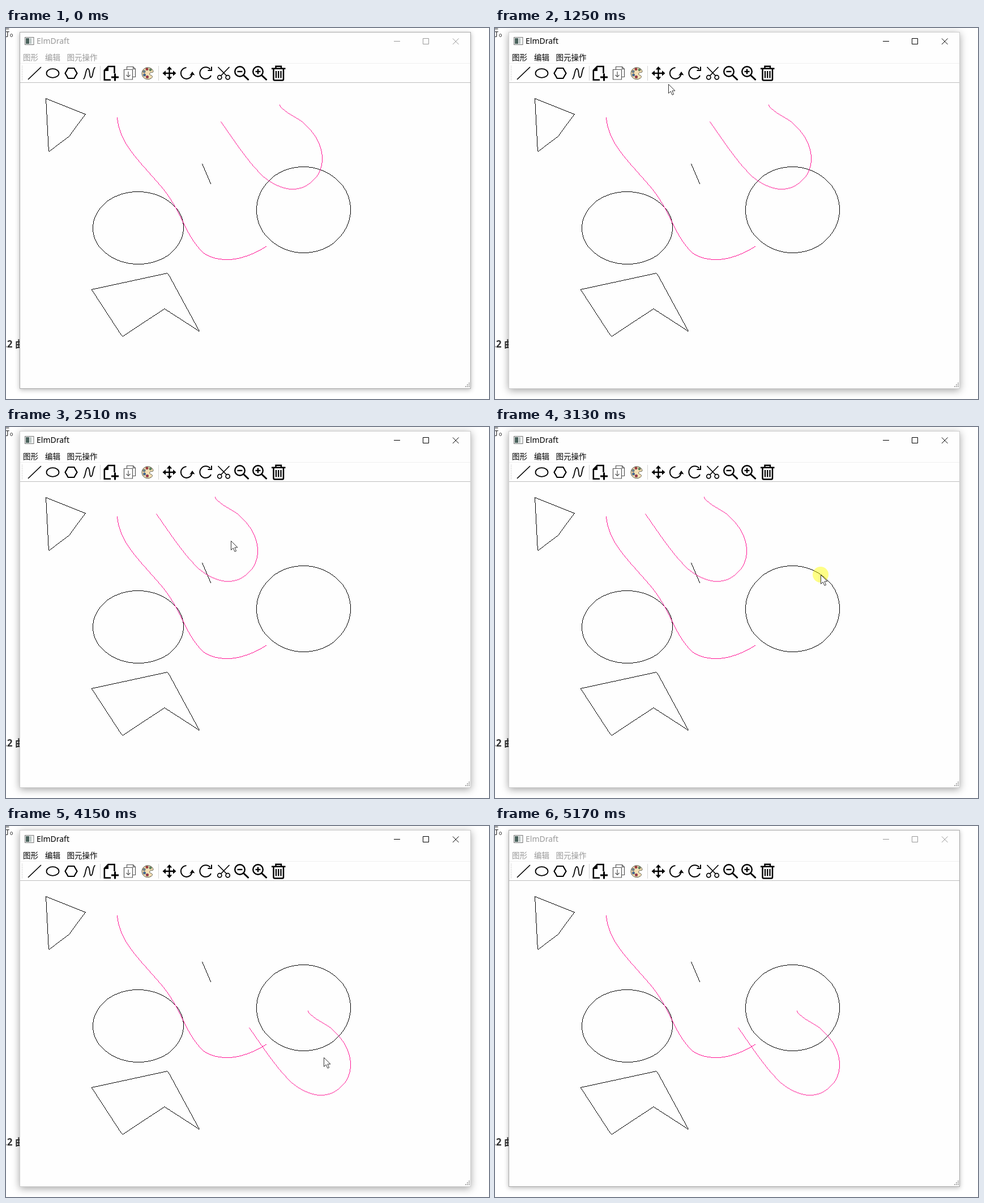
An HTML page that plays this animation: 853x656 px, repeating every 5310 ms.

```html
<!DOCTYPE html>
<html lang="zh-CN">
<head>
<meta charset="utf-8">
<title>ElmDraft</title>
<style>
html, body { margin: 0; width: 100%; height: 100%; overflow: hidden; background: #fff; }
svg { position: absolute; left: 0; top: 0; display: block; }
text { font-family: "Noto Sans", "Noto Sans CJK SC", "Noto Sans CJK", sans-serif; fill: currentColor; }

.page { color: #333; }
.window {
  position: absolute; left: 24px; top: 7px; width: 795px; height: 629px;
  background: #fefefe; border: 1px solid #aaa;
}
.icons { fill: none; stroke: #000; stroke-width: 2.2; }
.icons .solid { fill: #000; stroke: none; }
.shapes { fill: none; stroke: #000; shape-rendering: crispEdges; }
.pink { stroke: #ff1493; }
.title { fill: none; stroke: currentColor; }
.title text { stroke: none; }

.window, .title, .hover, .moved, .cursor, .press {
  animation: 5310ms step-end infinite;
}
.window { animation-name: shadow; }
.title { animation-name: focus; }
.hover { animation-name: hover; }
.moved { animation-name: moved; }
.cursor { animation-name: cursor; }
.press { animation-name: press; }

@keyframes shadow {
  0%, 97.36%, 100% { box-shadow: 0 2px 8px rgba(0,0,0,.28); border-color: #aaa; }
  16.19% { box-shadow: 0 3px 13px rgba(0,0,0,.36); border-color: #cfcfcf; }
}
@keyframes focus {
  0%, 97.36%, 100% { color: #999; }
  16.19% { color: #000; }
}
@keyframes hover {
  0%, 22.22%, 100% { opacity: 0; }
  12.05% { opacity: 1; }
}
@keyframes press {
  0%, 19.02%, 41.61%, 61.77%, 76.64%, 100% { opacity: 0; }
  16.19%, 31.07%, 51.41%, 72.12% { opacity: 1; }
}
@keyframes moved {
  0%, 100% { transform: translate(0, 0); }
  41.61% { transform: translate(-114px, -12px); }
  64.97% { transform: translate(66px, 50px); }
  78.15% { transform: translate(50px, 191px); }
}
@keyframes cursor {
  0%, 92.84%, 100% { transform: translate(-50px, -50px); }
  1.31% { transform: translate(689px, 579px); animation-timing-function: steps(6); }
  10.16% { transform: translate(317px, 96px); }
  12.05% { transform: translate(289px, 85px); }
  14.68% { transform: translate(286px, 83px); }
  22.22% { transform: translate(306px, 99px); animation-timing-function: steps(3); }
  26.55% { transform: translate(425px, 195px); animation-timing-function: steps(2); }
  29.56% { transform: translate(474px, 212px); }
  31.07% { transform: translate(475px, 204px); }
  34.08% { transform: translate(452px, 204px); }
  35.59% { transform: translate(418px, 203px); }
  37.09% { transform: translate(377px, 196px); }
  38.79% { transform: translate(361px, 192px); }
  44.25% { transform: translate(372px, 194px); }
  45.76% { transform: translate(388px, 199px); }
  47.26% { transform: translate(397px, 201px); }
  51.41% { transform: translate(397px, 201px); animation-timing-function: steps(5); }
  58.94% { transform: translate(575px, 261px); }
  60.45% { transform: translate(577px, 262px); }
  69.3% { transform: translate(577px, 267px); }
  72.12% { transform: translate(577px, 267px); animation-timing-function: steps(2); }
  75.14% { transform: translate(561px, 409px); }
  79.84% { transform: translate(562px, 410px); }
  82.48% { transform: translate(588px, 433px); animation-timing-function: steps(6); }
  91.33% { transform: translate(815px, 641px); }
}
</style>
</head>
<body>
<svg class="page" width="853" height="656">
  <text x="-9.5" y="14" font-size="16">行。</text>
  <text x="-3" y="564.5" font-size="17" font-weight="700">.2 曲线</text>
</svg>

<div class="window"></div>

<svg width="853" height="656" viewBox="0 0 853 656">
  <!-- title bar and menu -->
  <rect x="33.5" y="16.5" width="15.5" height="13" fill="#f4f6f6" stroke="#777"/>
  <rect x="35" y="18" width="6" height="10" fill="#4a625c"/>
  <rect x="42" y="18" width="3" height="10" fill="#b9c4c2"/>
  <g class="title">
    <text x="54" y="28" font-size="14">ElmDraft</text>
    <g font-size="13.5">
      <text x="30" y="56.5">图形</text>
      <text x="69" y="56.5">编辑</text>
      <text x="107.5" y="56.5">图元操作</text>
    </g>
    <path d="M685 23.5h11M736.5 18.5h10v10h-10zM789 18.5l10.5 10.5M799.5 18.5L789 29"/>
  </g>

  <!-- toolbar -->
  <path d="M25 62.5H820" stroke="#f0f0f0"/>
  <path d="M25 96.5H820" stroke="#bebebe"/>
  <path d="M28.5 67V93" stroke="#aaa" stroke-dasharray="1 2"/>
  <path d="M166.5 67V93M269.5 67V93" stroke="#d4d4d4"/>
  <rect class="hover" x="273" y="64" width="32" height="32" fill="#e2f1fd"/>

  <g class="icons">
    <path d="M39 91L62 69" stroke-width="1.7"/>
    <ellipse cx="82.5" cy="80" rx="11" ry="7.8" stroke-width="1.8"/>
    <path d="M104.5 80L109.7 71H120.3L125.5 80L120.3 89H109.7Z"/>
    <path d="M136.5 90.5C141 89 140 72 144.5 72S146.500 88 150.500 87.500C154.500 86 152.500 72 157.500 69.500" stroke-width="1.8"/>

    <path d="M191.5 80V68H180.5L173.8 75V91.7H185" stroke-width="2.6"/>
    <path class="solid" d="M181 67V76H173Z"/>
    <path d="M192.5 80.5V93.5M186 87H199" stroke-width="3"/>

    <g stroke="#555" stroke-width="1.2">
      <path d="M213.5 73V68.5H224.5L228.5 72.5V86.5H223.5M224.5 68.5V72.5H228.5"/>
      <path d="M208.5 73.5H223.5V91H208.5ZM216 77V86M212.5 83L216 86.5L219.5 83"/>
    </g>

    <path d="M258 73A10.5 10.5 0 1 0 257 88.5C260 86 258 84 255.5 83.5C252 82 254 78 257.5 78.5C261 79 260.5 75.5 258 73Z" fill="#f5dfb4" stroke="#554" stroke-width="1"/>
    <g stroke="#444" stroke-width=".6">
      <circle cx="249" cy="72.8" r="2.2" fill="#b8343c"/>
      <circle cx="255" cy="74" r="2" fill="#5a9460"/>
      <circle cx="244" cy="77" r="2.2" fill="#6f8a9c"/>
      <circle cx="244.5" cy="83" r="2.2" fill="#3f6fa8"/>
      <circle cx="249.5" cy="86.5" r="2.3" fill="#a82f48"/>
    </g>

    <path d="M288.5 71V89M279 80H298" stroke-width="2.4"/>
    <path class="solid" d="M288.5 68l4.8 5.5h-9.6zM288.5 92l4.8-5.5h-9.6zM276.5 80l5.5-4.8v9.6zM300.5 80l-5.5-4.8v9.6z"/>

    <path d="M318.5 70A10 10 0 1 0 328.8 81" stroke-width="2"/>
    <path class="solid" d="M329 77l4.5 6.5l-5-1l-4.5 2z"/>

    <path d="M362 84A10.3 10.3 0 1 1 360.5 73" stroke-width="2"/>
    <path d="M363 68.5V75H356.5" stroke-width="2"/>

    <g stroke-width="1.7">
      <path d="M374.5 69L389.5 84.5M394.5 69L379.5 84.5"/>
      <circle cx="377.3" cy="87.3" r="3.6"/>
      <circle cx="391.7" cy="87.3" r="3.6"/>
    </g>

    <g id="lens" stroke-width="2.4">
      <circle cx="413" cy="77" r="8.8"/>
      <path d="M408.5 77H417.5"/>
      <path d="M419.5 83.5L428.5 92" stroke-width="3"/>
    </g>
    <use href="#lens" x="32"/>
    <path d="M445 72.5V81.5" stroke-width="2.4"/>

    <path d="M469 71.8H493.5M476.5 71V67.8H486V71M472.5 72V90.5Q472.5 92.5 474.5 92.5H488Q490 92.5 490 90.5V72" stroke-width="2.5"/>
    <path d="M477 76V88.5M481.2 76V88.5M485.5 76V88.5"/>
  </g>

  <path d="M817 628h2M814 631h2M817 631h2M811 634h2M814 634h2M817 634h2" stroke="#aaa" stroke-width="2"/>

  <!-- drawing -->
  <g class="shapes" transform="translate(0 .5)">
    <path d="M70 124L140 152L112 190L75 218Z"/>
    <path d="M153 353a80 64 0 0 1 160 0a80 64 0 0 1 -160 0"/>
    <path d="M442 321a83 76 0 0 1 166 0a83 76 0 0 1 -166 0"/>
    <path d="M346 240L361 275"/>
    <path d="M151 462L285 433L341 536L279 496L205 545Z"/>
    <path class="pink" d="M196 158C197 176 206 198 217 213C233 236 255 258 275 282C290 300 303 323 313 345C325 370 338 390 350 398C362 406 376 409 390 409C415 409 440 398 459 386"/>
    <path class="pink moved" d="M379 165C398 192 424 232 447 255C464 272 487 284 506 284C536 284 558 258 558 230C558 206 545 184 525 167C510 155 489 148 483 135"/>
  </g>

  <g class="cursor">
    <circle class="press" r="14" fill="#ff0" fill-opacity=".47"/>
    <path d="M.5 .5V16.5L4.2 13L7 19.3L9.6 18.2L6.9 12H12Z" fill="#fff" stroke="#333"/>
  </g>
</svg>

<script>
// Redraw a path as a one-pixel line without smoothing.
function pixelate(path) {
  const pixels = [], length = path.getTotalLength();
  for (let s = 0; s <= length; s += 0.25) {
    const p = path.getPointAtLength(s);
    const x = Math.round(p.x), y = Math.round(p.y);
    const last = pixels.at(-1), prev = pixels.at(-2);
    if (last && last.x === x && last.y === y) continue;
    // Drop the corner of an L so that diagonals stay thin.
    if (prev && Math.abs(prev.x - x) === 1 && Math.abs(prev.y - y) === 1) pixels.pop();
    pixels.push({ x, y });
  }
  path.setAttribute('d', pixels.map(({ x, y }) => `M${x} ${y}h1`).join(''));
}
document.querySelectorAll('.shapes path').forEach(pixelate);
</script>
</body>
</html>
```
